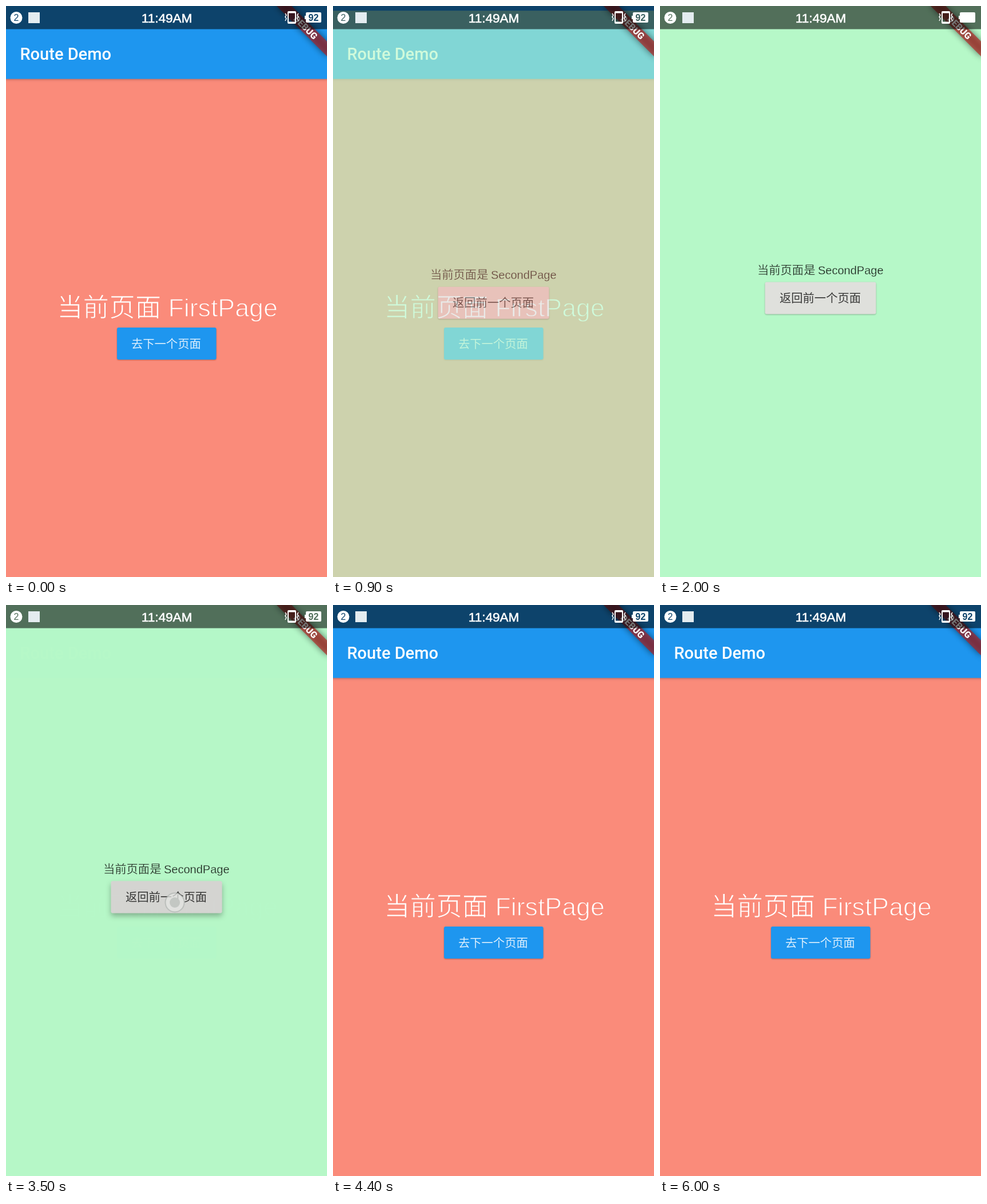
These frames come from a looping animation (561x998 px, 6.1 s). An HTML page:

```html
<!DOCTYPE html>
<html lang="zh-CN">
<head>
<meta charset="utf-8">
<style>
  html, body { margin: 0; width: 100%; height: 100%; overflow: hidden; }
  svg { display: block; }
  text { font-family: "Liberation Sans", Arial, sans-serif; }
  .zh { font-family: "Noto Sans CJK SC", "Noto Sans CJK", sans-serif; font-weight: 300; }
  .roboto { font-family: Roboto, sans-serif; }
  .bar { filter: drop-shadow(0 1.5px 2px #0004); }
</style>
</head>
<body>
<svg width="561" height="998" viewBox="0 0 561 998">
  <defs>
    <mask id="cutout" maskUnits="userSpaceOnUse" x="0" y="0" width="561" height="41">
      <rect width="561" height="41" fill="#fff"/>
      <text x="18" y="26" font-size="16" text-anchor="middle">2</text>
      <text id="level" x="537.5" y="26" font-size="16" font-weight="700" text-anchor="middle">92</text>
    </mask>
  </defs>

  <!-- A stroke in the background colour thins regular glyphs to a light weight. -->
  <g id="first">
    <rect width="561" height="998" fill="#fa8b7a"/>
    <rect class="bar" x="-10" y="-10" width="581" height="137.500" fill="#1e96ef"/>
    <text class="roboto" x="24.500" y="94" font-size="29" font-weight="500" fill="#fff">Route Demo</text>
    <g fill="#fff" stroke="#fa8b7a">
      <text class="zh" x="89" y="543" font-size="45.600" stroke-width="1.100">当前页面</text>
      <text x="283.500" y="543" font-size="44.700" stroke-width="1.300">FirstPage</text>
    </g>
    <g class="button">
      <rect x="194" y="562" width="173.500" height="56" rx="3" fill="#1e96ef"/>
      <rect class="glow" x="194" y="562" width="173.500" height="56" rx="3" fill="#bcbcbc"/>
    </g>
    <text class="zh" x="219" y="597.500" font-size="20.300" fill="#fff" fill-opacity=".85">去下一个页面</text>
  </g>

  <g id="second">
    <rect width="561" height="998" fill="#b6f8c8"/>
    <g fill-opacity=".87" stroke="#b6f8c8" stroke-width=".35">
      <text class="zh" x="170" y="469" font-size="20.300">当前页面是</text>
      <text x="276" y="469" font-size="20">SecondPage</text>
    </g>
    <g class="button">
      <rect x="183.500" y="482.500" width="194" height="56" rx="3" fill="#dfe0dc"/>
      <rect class="glow" x="183.500" y="482.500" width="194" height="56" rx="3" fill="#bcbcbc"/>
    </g>
    <text class="zh" x="209" y="518" font-size="20.300" fill-opacity=".75">返回前一个页面</text>
  </g>

  <g transform="translate(561) rotate(45)">
    <rect x="-62.300" y="43.600" width="124.700" height="18.700" opacity=".5" style="filter:blur(6px)"/>
    <rect x="-62.300" y="43.600" width="124.700" height="18.700" fill="#b71c1c" fill-opacity=".63"/>
    <text class="roboto" y="58.600" font-size="15.900" font-weight="900" fill="#fff" text-anchor="middle">DEBUG</text>
  </g>

  <rect width="561" height="40.500" fill-opacity=".55"/>
  <g fill="#fff" mask="url(#cutout)">
    <circle cx="18" cy="20.500" r="10.500"/>
    <rect x="39" y="11" width="20" height="19" fill="#e4ecf0"/>
    <text x="281" y="28.500" font-size="22.500" text-anchor="middle" stroke="#fff" stroke-width=".6">11:49AM</text>
    <path d="M494 9h11q2 0 2 2v18q0 2-2 2h-11q-2 0-2-2V11q0-2 2-2zM494 12.500v15h11v-15z" fill-rule="evenodd"/>
    <path d="M488 13l2 3-2 3 2 3-2 4M511 13l-2 3 2 3-2 3 2 4" fill="none" stroke="#fff" stroke-width="1.500"/>
    <path d="M526 11h23q2 0 2 2v14q0 2-2 2h-23q-2 0-2-2v-4h-2v-6h2v-4q0-2 2-2z"/>
  </g>

  <g id="touch">
    <circle r="16.500" fill="#e4e6e3" fill-opacity=".75" stroke="#a9aeaa" stroke-opacity=".6" stroke-width="2"/>
    <circle r="9" fill="#c3c7c3"/>
  </g>
</svg>
<script>
const LOOP = 6100;
const $ = id => document.getElementById(id);
const clamp = v => Math.max(0, Math.min(1, v));

function bezier(x1, y1, x2, y2) {
  const at = (a, b, s) => 3 * a * s * (1 - s) ** 2 + 3 * b * s * s * (1 - s) + s ** 3;
  return x => {
    let lo = 0, hi = 1;
    for (let i = 0; i < 24; i++) {
      const mid = (lo + hi) / 2;
      if (at(x1, x2, mid) < x) lo = mid; else hi = mid;
    }
    return at(y1, y2, lo);
  };
}
const easeIn = bezier(.42, 0, 1, 1);
const fastOutSlowIn = bezier(.4, 0, .2, 1);

const taps = [
  { page: $('first'), x: 285, y: 598, down: 560, up: 690 },
  { page: $('second'), x: 295, y: 520, down: 3370, up: 3540 }
];

function drawPress(tap, t) {
  const press = clamp((t - tap.down) / 100) * clamp(1 - (t - tap.up) / 150);
  tap.page.querySelector('.glow').style.opacity = .33 * press;
  tap.page.querySelector('.button').style.filter =
    `drop-shadow(0 ${1.5 + 4 * press}px ${1.2 + 3.8 * press}px rgba(0,0,0,.28))`;
}

function draw(t) {
  const shown = t < 3000 ? clamp((t - 669) / 300) : clamp(1 - (t - 3500) / 275);
  const second = $('second');
  second.setAttribute('opacity', easeIn(shown));
  second.setAttribute('transform', `translate(0 ${249.5 * (1 - fastOutSlowIn(shown))})`);
  second.style.display = shown ? '' : 'none';

  taps.forEach(tap => drawPress(tap, t));
  const active = taps.find(tap => t >= tap.down && t < tap.up);
  $('touch').style.display = active ? '' : 'none';
  if (active) $('touch').setAttribute('transform', `translate(${active.x} ${active.y})`);

  // The charging battery alternates between its level and a full block.
  $('level').style.display = t % 3000 < 1500 ? '' : 'none';
}

const start = performance.now();
function tick() {
  draw((performance.now() - start) % LOOP);
  requestAnimationFrame(tick);
}
tick();
</script>
</body>
</html>
```
